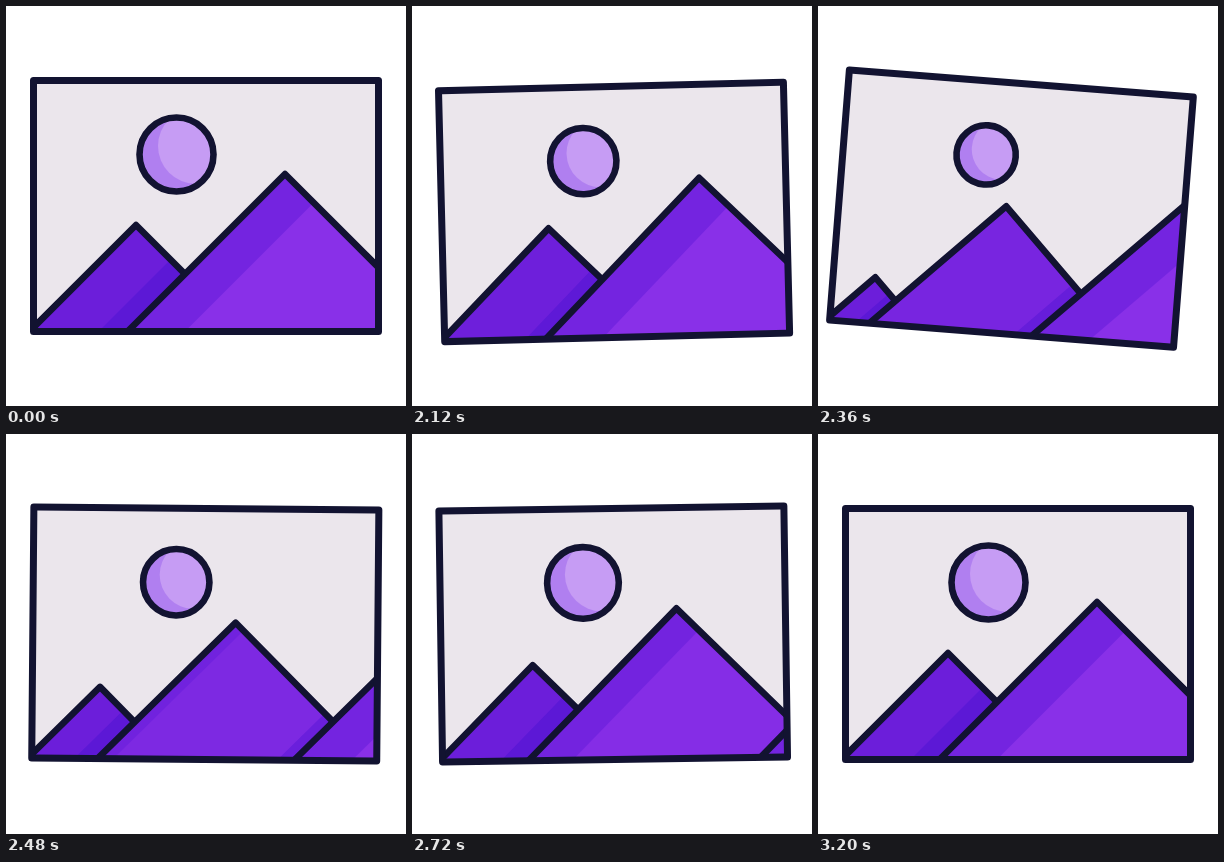
Animation, 400 px wide and 400 px high, one loop 3230 ms. Source, as an HTML page with a canvas:

```html
<!DOCTYPE html>
<html lang="en">
<head>
<meta charset="utf-8">
<title>Swinging picture</title>
<style>
  html, body { margin: 0; height: 100%; overflow: hidden; background: #fff; }
  canvas { display: block; width: 400px; height: 400px; }
</style>
</head>
<body>
<canvas width="400" height="400"></canvas>
<script>
const ctx = document.querySelector('canvas').getContext('2d');
const LOOP = 3230, START = 2000, LENGTH = 1200;
const INK = '#121331', BASE = 325.5;
const LEFT = { x: 130, h: 106.5, light: [108, 30, 218], dark: [92, 24, 214] };
const MAIN = { x: 279, h: 157.5, light: [137, 48, 232], dark: [116, 36, 224] };

const mix = (a, b, k) => a + (b - a) * k;
const clamp = v => Math.min(1, Math.max(0, v));
const rgb = (a, b, k) => `rgb(${a.map((v, i) => Math.round(mix(v, b[i], k)))})`;

function bezier(x1, y1, x2, y2) {
  const at = (a, b, s) => 3 * (1 - s) * s * ((1 - s) * a + s * b) + s ** 3;
  return x => {
    if (x <= 0 || x >= 1) return clamp(x);
    let lo = 0, hi = 1;
    for (let i = 0; i < 24; i++) {
      const mid = (lo + hi) / 2;
      if (at(x1, x2, mid) < x) lo = mid; else hi = mid;
    }
    return at(y1, y2, lo);
  };
}
const slide = bezier(.4, 0, .13, 1);
const grow = bezier(.35, .2, .35, 1);
const rebound = bezier(.2, 0, 0, 1);

// Cosine interpolation through [time, value] keys
function keyed(keys, t) {
  const i = keys.findIndex(k => k[0] > t);
  if (i < 0) return keys[keys.length - 1][1];
  if (i === 0) return keys[0][1];
  const [t0, v0] = keys[i - 1], [t1, v1] = keys[i];
  return mix(v0, v1, (1 - Math.cos(Math.PI * (t - t0) / (t1 - t0))) / 2);
}
const SWING = [[2000, 0], [2080, -1.9], [2320, 4.9], [2590, -1.9], [2900, .9], [3200, 0]];
const DROP = [[2000, 0], [2200, 9], [2460, 0]];

// Bands are [distance along the base, colour], painted from there to the right
function mountain(x, h, bands) {
  const left = x - h, path = new Path2D();
  path.moveTo(left, BASE);
  path.lineTo(x, BASE - h);
  path.lineTo(x + h, BASE);
  ctx.save();
  ctx.clip(path);
  for (const [d, color] of bands) {
    ctx.fillStyle = color;
    ctx.beginPath();
    ctx.moveTo(left + d, BASE);
    ctx.lineTo(left + d + 400, BASE - 400);
    ctx.lineTo(left + d + 800, BASE);
    ctx.fill();
  }
  ctx.restore();
  ctx.stroke(path);
}

function sun(scale) {
  const r = 37 * scale, x = 170.5, y = 148.5;
  const disc = new Path2D();
  disc.arc(x, y, r, 0, 7);
  ctx.fillStyle = '#b07ff0';
  ctx.fill(disc);
  ctx.save();
  ctx.clip(disc);
  ctx.fillStyle = '#c69cf4';
  ctx.beginPath();
  ctx.arc(x + 19.5 * scale, y - 8.5 * scale, 38 * scale, 0, 7);
  ctx.fill();
  ctx.restore();
  ctx.stroke(disc);
}

function draw(t) {
  const u = clamp((t - START) / LENGTH);
  const p = slide(u), q = grow(u);
  const sunScale = u < .22 ? 1 - .24 * (1 - Math.cos(Math.PI * u / .22)) / 2
                           : mix(.76, 1, rebound((u - .22) / .78));

  ctx.fillStyle = '#fff';
  ctx.fillRect(0, 0, 400, 400);
  ctx.save();
  ctx.translate(200, 117 + keyed(DROP, t));
  ctx.rotate(keyed(SWING, t) * Math.PI / 180);
  ctx.translate(-200, -117);
  ctx.strokeStyle = INK;
  ctx.lineWidth = 6.6;
  ctx.lineJoin = 'round';

  const frame = new Path2D();
  frame.rect(27.5, 74.5, 345, 251);
  ctx.fillStyle = '#ebe6ec';
  ctx.fill(frame);
  ctx.save();
  ctx.clip(frame);
  sun(sunScale);

  // A new left peak rises, the left one becomes the main one, the main one leaves
  const h = LEFT.h * p;
  if (p > 0) {
    mountain(LEFT.x - LEFT.h + h, h,
      [[0, rgb(LEFT.light, LEFT.light, 0)], [69 * p, rgb(LEFT.dark, LEFT.dark, 0)]]);
  }
  mountain(mix(LEFT.x, MAIN.x, p), mix(LEFT.h, MAIN.h, q), [
    [0, rgb(LEFT.light, MAIN.dark, q)],
    [Math.max(0, mix(-70, 57.5, p)), rgb(LEFT.light, MAIN.light, q)],
    [mix(69, 254, q), rgb(LEFT.dark, MAIN.dark, q)]
  ]);
  if (p < 1) {
    mountain(MAIN.x + 250 * p, MAIN.h,
      [[0, rgb(MAIN.dark, MAIN.dark, 0)], [57.5, rgb(MAIN.light, MAIN.light, 0)]]);
  }
  ctx.restore();

  ctx.lineWidth = 7;
  ctx.stroke(frame);
  ctx.restore();
}

function tick() {
  draw(performance.now() % LOOP);
  requestAnimationFrame(tick);
}
tick();
</script>
</body>
</html>
```
